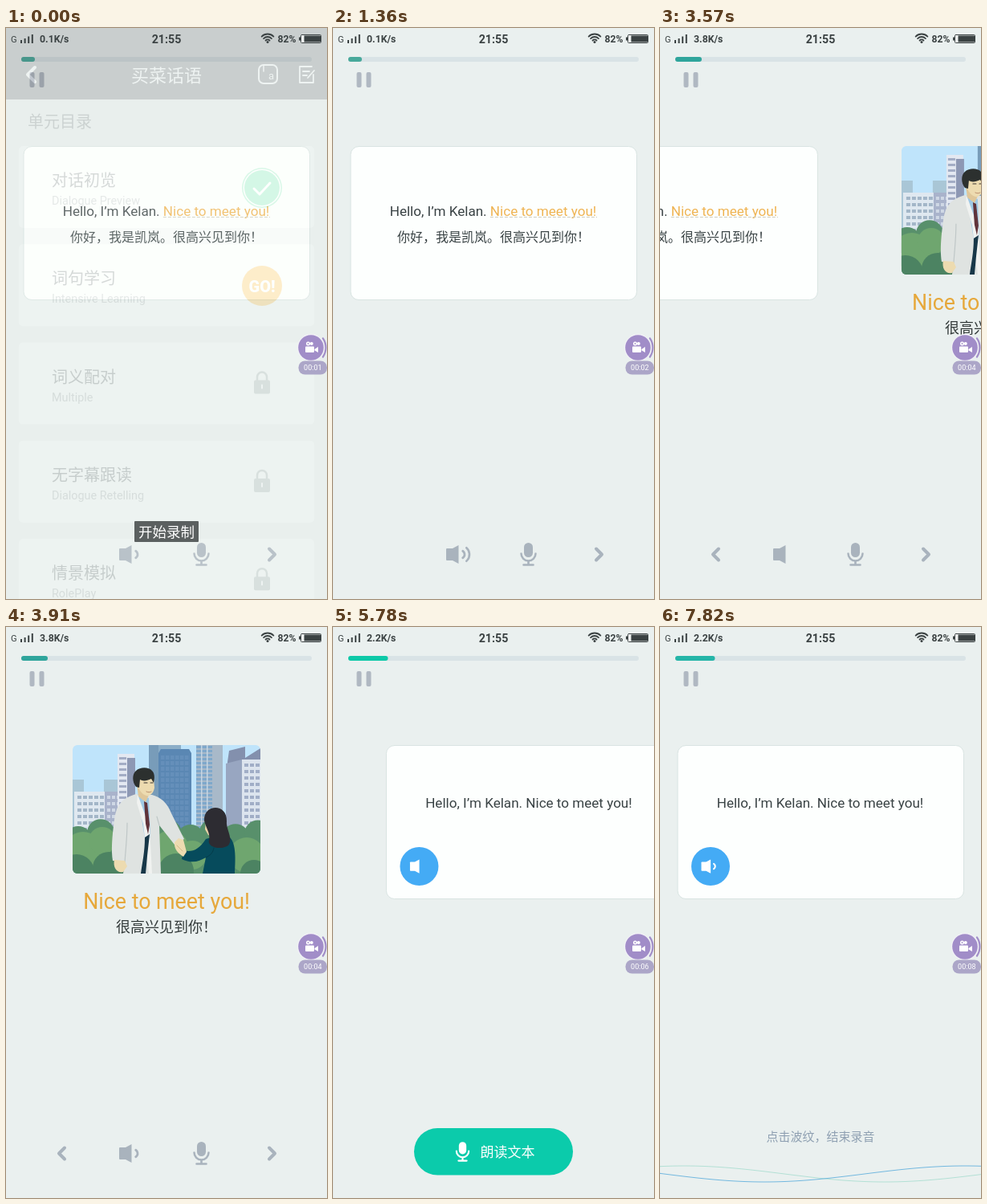
An HTML page with a canvas that plays this animation: 400 px wide and 711 px high, repeating every 7.99 s.

```html
<!DOCTYPE html>
<html lang="zh">
<head>
<meta charset="utf-8">
<title>Lesson</title>
<style>
html, body { margin: 0; width: 100%; height: 100%; overflow: hidden; background: #eaf0ef; }
canvas { display: block; width: 100vw; height: 100vh; }
</style>
</head>
<body>
<canvas id="stage"></canvas>
<script>
const W = 400, H = 711, LOOP = 7990, TICK = 170;
const LATIN = 'Roboto, "Noto Sans", sans-serif';
const HAN = '"Noto Sans CJK SC", "Noto Sans CJK", sans-serif';
// this cut centres the full-width exclamation mark
const SPOKEN = '"Noto Sans CJK JP", "Noto Sans CJK", sans-serif';
const BG = '#eaf0ef', ICON = '#a9b3bd', INK = '#394244', GOLD = '#efb453';
const SLIDES = [3460, 5500], SLIDE_MS = 420;
const RECORD_AT = 7140;

const dpr = window.devicePixelRatio || 1;
const stage = document.getElementById('stage');
let c = setup(stage);

function setup(canvas) {
  canvas.width = W * dpr;
  canvas.height = H * dpr;
  const g = canvas.getContext('2d');
  g.scale(dpr, dpr);
  return g;
}

// drawing helpers
function box(x, y, w, h, r, fill, line) {
  c.beginPath();
  c.roundRect(x, y, w, h, r);
  c.fillStyle = fill;
  c.fill();
  if (line) { c.strokeStyle = line; c.lineWidth = 1; c.stroke(); }
}
function disc(x, y, r, fill) {
  c.beginPath();
  c.arc(x, y, r, 0, Math.PI * 2);
  c.fillStyle = fill;
  c.fill();
}
function fill(d, color) {
  c.fillStyle = color;
  c.fill(new Path2D(d));
}
function stroke(d, color, width) {
  c.strokeStyle = color;
  c.lineWidth = width;
  c.lineCap = c.lineJoin = 'round';
  c.stroke(new Path2D(d));
}
function arc(x, y, r, a, b, color, width) {
  c.beginPath();
  c.arc(x, y, r, a, b);
  c.strokeStyle = color;
  c.lineWidth = width;
  c.lineCap = 'round';
  c.stroke();
}
function text(s, x, y, size, color, family = LATIN, align = 'left', weight = 400) {
  c.font = `${weight} ${size}px ${family}`;
  c.textAlign = align;
  c.fillStyle = color;
  c.fillText(s, x, y);
}
function at(x, y, k, draw) {
  c.save();
  c.translate(x, y);
  c.scale(k, k);
  draw();
  c.restore();
}
// last value whose start time has passed
const pick = (t, steps) => steps.filter(s => s[0] <= t).pop()[1];
const clamp = v => Math.max(0, Math.min(1, v));

// icons
function speaker(x, y, k, waves, color) {
  at(x, y, k, () => {
    box(-8, -7.5, 9, 15, 1, color);
    fill('M0-7.5 7.5-11.5V11.5L0 7.5z', color);
    if (waves > 0) arc(10, 0, 5, -1, 1, color, 2.8);
    if (waves > 1) arc(10, 0, 11, -0.85, 0.85, color, 2.6);
  });
}
function mic(x, y, k, color) {
  at(x, y, k, () => {
    box(-5.5, -14.5, 11, 18, 5.5, color);
    arc(0, -1, 9, 0, Math.PI, color, 2.5);
    stroke('M0 9V13M-6 13H6', color, 2.6);
  });
}
function chevron(x, dir) {
  at(x, 655.5, 1, () => stroke(`M${-3.5 * dir}-7 ${3.5 * dir} 0 ${-3.5 * dir} 7`, ICON, 4));
}
function lock(x, y) {
  const gray = '#93a39d';
  box(x - 10, y - 4, 20, 17, 2, gray);
  stroke(`M${x - 6} ${y - 4}v-4a6 6 0 0 1 12 0v4`, gray, 2.5);
  box(x - 1, y + 1, 2, 6, 1, '#ffffff');
}

function statusBar(t) {
  const ink = '#3b4243';
  text('G', 6, 17.5, 11.2, ink);
  [4, 6, 8.5, 11].forEach((h, i) => box(18 + i * 4.6, 19 - h, 2, h, 0, ink));
  text(pick(t, [[0, '0.1K/s'], [2550, '3.8K/s'], [5610, '2.2K/s']]), 42, 18, 12.3, ink, LATIN, 'left', 700);
  text('21:55', 200, 19, 14.2, ink, LATIN, 'center', 700);
  [3.5, 7, 10.5].forEach(r => arc(326, 18, r, -2.35, -0.79, ink, 1.8));
  disc(326, 17.5, 1.5, ink);
  text('82%', 338.5, 18, 12.2, ink, LATIN, 'left', 700);
  box(365, 11.5, 2, 4, 0, ink);
  box(367.5, 8.5, 25, 10, 1, '#f4f7f6', ink);
  box(371.5, 9.5, 20.5, 8, 0, ink);
}

function recorder(t) {
  const purple = '#a18dc8';
  disc(380, 398, 17, '#f3f2f8');
  disc(380, 398, 15.8, purple);
  arc(378, 398, 20.5, -0.6, 0.6, purple, 2.2);
  disc(376.5, 393, 2.5, '#fff');
  disc(380.8, 393, 2, '#fff');
  disc(376.5, 393, 0.9, purple);
  box(373, 396.5, 11, 7.5, 1, '#fff');
  fill('M384.5 400 389 397V404L384.5 401.5z', '#fff');
  box(364.5, 414.5, 35.5, 17, 8, '#aca6c8');
  const sec = Math.floor((t + 1040) / 1000);
  text('00:0' + sec, 382.3, 426.3, 9, '#fff', LATIN, 'center');
}

function card() {
  box(22, 147.5, 356.5, 191, 10, '#fdfffe', '#d9e4e2');
}

function pageIntro() {
  card();
  const size = 17.08, a = 'Hello, I’m Kelan. ', b = 'Nice to meet you!';
  text(a, 70.7, 234, size, INK);
  const x = 70.7 + c.measureText(a).width;
  text(b, x, 234, size, GOLD);
  c.save();
  c.setLineDash([4, 2]);
  c.lineCap = 'butt';
  c.strokeStyle = '#cfcdbd';
  c.lineWidth = 1;
  c.beginPath();
  c.moveTo(x, 235.5);
  c.lineTo(329, 235.5);
  c.stroke();
  c.restore();
  text('你好，我是凯岚。很高兴见到你！', 80, 266, 16, INK, SPOKEN);
}

function windows(x, y, cols, rows, dx, dy, w, h, color) {
  c.fillStyle = color;
  for (let i = 0; i < cols; i++)
    for (let j = 0; j < rows; j++) c.fillRect(x + i * dx, y + j * dy, w, h);
}

function city() {
  box(83, 147, 234, 160, 0, '#bfe4fb');
  fill('M83 190h14v60h-14zM122 190h18v60h-18z', '#a9c6d6');
  // left block and its tower
  fill('M85 205h61v70h-61z', '#dfe8f0');
  fill('M123 205h22v70h-22z', '#a9b3cb');
  windows(89, 210, 5, 6, 7, 8, 5, 4, '#a3b6c8');
  windows(126, 210, 3, 6, 6, 8, 4, 4, '#cfd8e5');
  fill('M139 158h21v100h-21z', '#e3e8f1');
  fill('M151 163h10v95h-10z', '#8d98b4');
  windows(141, 162, 1, 12, 6, 7, 9, 3, '#a3adc5');
  // blue towers
  fill('M178 147h40v120h-40z', '#8caec8');
  fill('M178 147h12v120h-12z', '#789cb9');
  fill('M190 157l3-5h35l3 5v110h-41z', '#5a87b3');
  windows(193, 160, 6, 14, 6, 7, 4.5, 5, '#658fba');
  fill('M237 147h33v115h-33z', '#a8b9c9');
  windows(237, 148, 1, 22, 1, 5, 20, 3, '#7fa8cb');
  windows(243, 147, 2, 1, 7, 1, 1.5, 115, '#c6d6e4');
  // right block
  fill('M276 168l2-14 20-5v14l19-12v105h-41z', '#8390ad');
  fill('M274 170l20-5v95h-20z', '#98a6c1');
  fill('M294 165h23v95h-23z', '#dce4ee');
  windows(297, 170, 3, 10, 7, 8, 5, 4, '#a1aec7');
}

function bushes() {
  for (let i = 0; i < 9; i++) disc(90 + i * 28, 265 - 9 * Math.abs(Math.sin(i * 1.3)), 17, '#58906b');
  fill('M83 268h234v39h-234z', '#58906b');
  [[96, 278, 23], [120, 266, 17], [205, 275, 22], [232, 284, 18], [300, 284, 22]].forEach(b => disc(...b, '#6fa66f'));
  [[88, 305, 22], [128, 300, 20], [212, 304, 22], [309, 307, 17]].forEach(b => disc(...b, '#4c8362'));
}

function people() {
  // woman
  fill('M249 264C240 278 231 281 221 278L219 289C231 295 241 292 249 287L245 307H285C286 290 287 270 279 262L262 260z', '#064b5c');
  stroke('M249 287C256 284 258 280 259 275', '#043c4b', 1);
  fill('M249 240L248 252 252 259 262 262 266 240z', '#ead2a6');
  fill('M247 241C246 220 276 219 275 242 274 252 284 264 277 272 269 278 250 275 253 265 255 257 249 250 247 241z', '#2d2c32');
  // man
  fill('M162 208C146 213 138 219 135 240 132 262 131 278 133 291L148 293 146 307H193L191 247 210 271 222 264 206 232C200 217 192 212 182 209z', '#dfe3e1');
  stroke('M151 244C151 262 149 278 148 293M191 247L188 236', '#bfc7c7', 1.2);
  fill('M164 208L178 213 180 263 173 263z', '#9fc9e5');
  fill('M164 208L163 219 171 245 178 307H182L179 250z', '#f0f2f0');
  fill('M172 217L176 219 179 246 177 258 174 245z', '#60333a');
  fill('M173 262L179 258 176 285 174 307H168C170 292 173 280 173 262z', '#173748');
  fill('M163 196L165 211 174 218 179 207z', '#dfc79a');
  fill('M163 188H184L185 200C184 207 179 211 175 210 168 208 163 200 163 188z', '#eddbb0');
  fill('M162 199C157 193 157 183 162 179 167 174 178 174 182 179 186 183 185 189 184 194L181 189C175 192 170 192 167 190L166 200z', '#2c302f');
  stroke('M172 194h4M180 194h3', '#3c3633', 1.1);
  stroke('M175 205c2 1 4 1 6 0', '#b98d6c', 1);
  // hands
  fill('M135 290C133 299 138 307 146 305L151 298 148 291z', '#eddbb0');
  fill('M210 268C209 277 215 282 221 286L225 280 221 265 215 263z', '#eddbb0');
  stroke('M213 272L220 279', '#cfb183', 0.8);
}

function pagePhrase() {
  c.save();
  c.beginPath();
  c.roundRect(83, 147, 234, 160, 6);
  c.clip();
  city();
  bushes();
  people();
  c.restore();
  text('Nice to meet you!', 200, 351, 26.8, '#e6a83b', LATIN, 'center');
  text('很高兴见到你！', 137, 380, 18, '#333a3a', SPOKEN);
}

function pageRead(t) {
  card();
  text('Hello, I’m Kelan. Nice to meet you!', 70.7, 225, 17.08, INK);
  disc(63, 298, 24, '#44abf5');
  speaker(57.5, 298, 0.75, t < 6290 ? 0 : Math.floor((t - 6290) / 340) % 3, '#fff');
}

function wave(t, crest, sign, color) {
  c.beginPath();
  const drift = (t - 7820) * 0.25;
  for (let x = 0; x <= W; x += 4)
    c.lineTo(x, 681 + sign * 10 * Math.cos((x - crest - drift) * Math.PI * 2 / 500));
  c.strokeStyle = color;
  c.lineWidth = 0.8;
  c.stroke();
}

function controls(t, page) {
  if (page < 2) {
    const playing = page ? t < 5100 : t < 3400;
    if (page) chevron(69.5, -1);
    speaker(149, 655.5, 1, playing ? (Math.floor((t + 170) / 340) + 1) % 3 : 0, ICON);
    mic(243.5, 655.5, 1, ICON);
    chevron(331.5, 1);
  } else if (t < RECORD_AT) {
    box(101, 624, 198, 58.5, 29.2, '#0bcbab');
    mic(161.5, 653.5, 0.85, '#fff');
    text('朗读文本', 183.5, 660, 17, '#fff', HAN);
  } else {
    text('点击波纹，结束录音', 132.5, 640, 15, '#8fa0b2', HAN);
    wave(t, 30, -1, '#a5dccf');
    wave(t, 130, 1, '#55aadb');
  }
}

function progress(t, page) {
  box(19, 36, 362, 6, 3, '#d9e3e6');
  const tint = pick(t, [[0, '#48a99b'], [2550, '#6f9fb5'], [3570, '#2fa59c'], [5100, '#5f8db0'], [5610, '#0dc9a8'], [7140, '#25b5a8']]);
  box(19, 36, [17, 33, 49.5][page], 6, 3, tint);
}

// the unit list that the lesson fades in over
function menu() {
  box(0, 0, W, H, 0, '#e6efe8');
  box(0, 0, W, 89, 0, '#4b4d4d');
  stroke('M36 49 27 58 36 67', '#fff', 4);
  text('买菜话语', 200, 66.5, 22, '#fff', HAN, 'center');
  c.beginPath();
  c.roundRect(315, 46, 23, 23, 6);
  c.strokeStyle = '#fff';
  c.lineWidth = 2;
  c.stroke();
  stroke('M321 47v7', '#fff', 1.5);
  text('a', 327, 64, 13, '#fff');
  stroke('M383 58v10H366V48h15M370 54h8M370 59h5M376 62l8-9', '#fff', 1.8);
  text('单元目录', 27, 124, 20, '#57605f', HAN);
  const rows = [['对话初览', 'Dialogue Preview'], ['词句学习', 'Intensive Learning'], ['词义配对', 'Multiple'],
    ['无字幕跟读', 'Dialogue Retelling'], ['情景模拟', 'RolePlay']];
  rows.forEach(([name, sub], i) => {
    const y = 147 + i * 122.3;
    box(16, y, 368, 102, 5, '#fbfff9');
    text(name, 57, y + 50, 20, '#3c4846', HAN);
    text(sub, 57, y + 73, 14.4, '#8a9592');
    if (i > 1) lock(319, y + 51);
  });
  disc(319, 199, 25, '#4fe092');
  disc(319, 199, 23.5, '#ffffff');
  disc(319, 199, 22, '#38dc88');
  stroke('M309 200l7 7 13-14', '#fff', 3);
  disc(319, 321, 25, '#ffa800');
  text('GO!', 319, 328.5, 20, '#fff', LATIN, 'center', 900);
}

function toast(alpha) {
  c.globalAlpha = alpha;
  box(160, 614, 80, 26, 1, '#5b6060');
  text('开始录制', 200, 633.5, 17.5, '#fff', HAN, 'center');
  c.globalAlpha = 1;
}

const menuLayer = document.createElement('canvas');
const main = c;
c = setup(menuLayer);
menu();
c = main;

const pages = [pageIntro, pagePhrase, pageRead];

function draw(t) {
  const page = SLIDES.filter(s => t >= s).length;
  box(0, 0, W, H, 0, BG);
  progress(t, page);
  box(29.5, 55, 6, 19, 2, '#b0b8c2');
  box(41.5, 55, 6, 19, 2, '#b0b8c2');

  const p = page ? clamp((t - SLIDES[page - 1]) / SLIDE_MS) : 1;
  const shift = W * (1 - p) ** 2;
  if (p < 1) at(shift - W, 0, 1, () => pages[page - 1](t));
  at(shift, 0, 1, () => pages[page](t));
  controls(t, page);

  const ghost = 0.2 * clamp(1 - t / 300);
  if (ghost) {
    c.globalAlpha = ghost;
    c.drawImage(menuLayer, 0, 0, W, H);
    c.globalAlpha = 1;
  }
  statusBar(t);
  recorder(t);
  if (t < 1020) toast(clamp((1020 - t) / 340));
}

const start = performance.now();
function loop() {
  const t = (performance.now() - start) % LOOP;
  draw(Math.floor(t / TICK) * TICK);
  requestAnimationFrame(loop);
}
loop();
</script>
</body>
</html>
```
